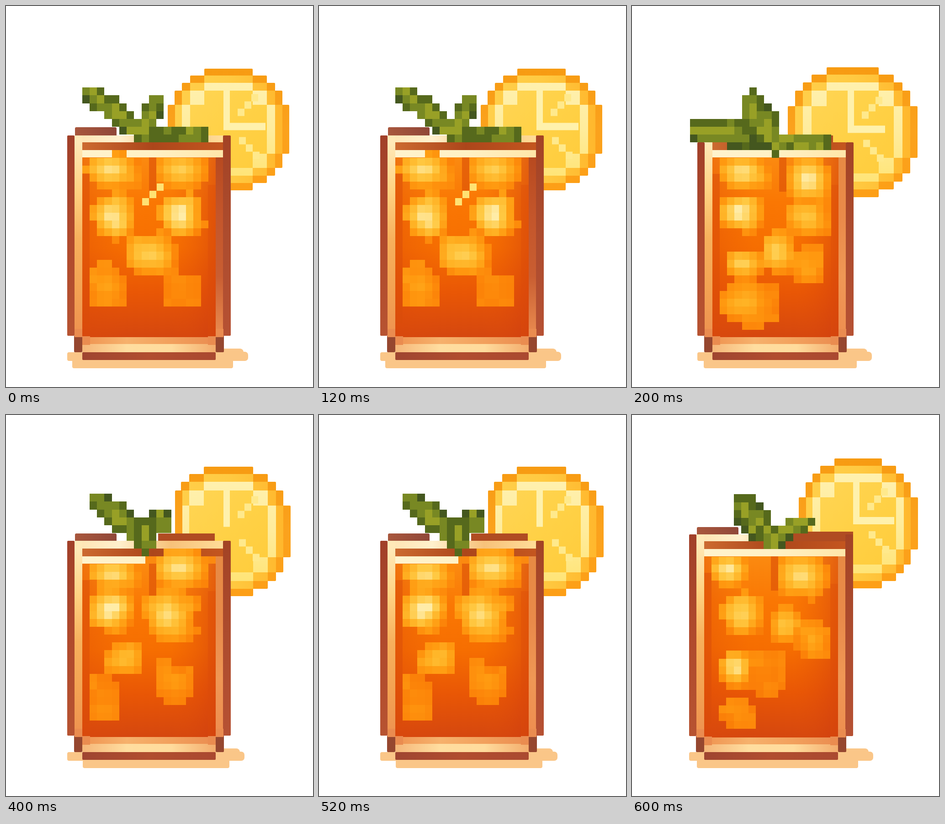
These frames come from a looping animation (672 px wide and 833 px high, 800 ms). An HTML page with a canvas:

```html
<!DOCTYPE html>
<html lang="en">
<head>
<meta charset="utf-8">
<title>Iced tea</title>
<style>
html, body { margin: 0; width: 100%; height: 100%; overflow: hidden; background: #fff; }
canvas { display: block; }
</style>
</head>
<body>
<canvas id="stage" width="672" height="833"></canvas>
<script>
const ctx = document.getElementById('stage').getContext('2d');
const CELL_W = 16.25, CELL_H = 17.1;

const BROWN = '#b04c22', UMBER = '#96472f', SALMON = '#ea8c50';
const ICE = [[240, 108, 4], [252, 130, 8], [255, 154, 16], [255, 178, 36], [255, 200, 66], [255, 219, 118], [255, 240, 180]];
const MINT = ['#44571f', '#56691c', '#788823', '#98a026'];

function rect(fill, x0, y0, x1, y1) {
  ctx.fillStyle = fill;
  ctx.fillRect(x0, y0, x1 - x0, y1 - y0);
}

function soft(fill, x0, y0, x1, y1, r = 2) {
  ctx.fillStyle = fill;
  ctx.beginPath();
  ctx.roundRect(x0, y0, x1 - x0, y1 - y0, r);
  ctx.fill();
}

function blend(x0, y0, x1, y1, ...colors) {
  const g = ctx.createLinearGradient(x0, y0, x1, y1);
  colors.forEach((c, i) => g.addColorStop(i / (colors.length - 1), c));
  return g;
}
const across = (x0, x1, ...colors) => blend(x0, 0, x1, 0, ...colors);
const down = (y0, y1, ...colors) => blend(0, y0, 0, y1, ...colors);

function dots(fill, x, y, dx, dy, n) {
  for (let k = 0; k < n; k++) rect(fill, x + dx * k, y + dy * k, x + dx * k + 15, y + dy * k + 16);
}

function noise(a, b) {
  const s = Math.sin(a * 12.9898 + b * 78.233) * 43758.5453;
  return s - Math.floor(s);
}

const clamp = v => Math.max(0, Math.min(1, v));

// Fills the big pixels inside a box; pick gets the cell's centre and indices.
function cells({ L, rim }, x0, y0, x1, y1, pick) {
  const gx = i => Math.round(L + i * CELL_W), gy = j => Math.round(rim + j * CELL_H);
  for (let j = Math.floor((y0 - rim) / CELL_H); gy(j) < y1; j++)
    for (let i = Math.floor((x0 - L) / CELL_W); gx(i) < x1; i++) {
      const fill = pick((gx(i) + gx(i + 1)) / 2, (gy(j) + gy(j + 1)) / 2, i, j);
      if (fill) rect(fill, gx(i), gy(j), gx(i + 1), gy(j + 1));
    }
}

function iceColor(t) {
  const f = clamp(t) * (ICE.length - 1), k = Math.min(ICE.length - 2, Math.floor(f));
  return `rgb(${ICE[k].map((c, n) => Math.round(c + (ICE[k + 1][n] - c) * (f - k)))})`;
}

// A blocky cube that fades from a bright core to the tea around it.
function cube(p, [x, y, w, h, light]) {
  cells(p, x - w, y - h, x + w, y + h, (cx, cy, i, j) => {
    const dx = (cx - x) / w, dy = (cy - y) / h;
    const d = Math.cbrt(Math.abs(dx) ** 3 + Math.abs(dy) ** 3);
    const grain = noise(i >> 1, j >> 1) - 0.5;
    if (d > 1 + grain * 0.2) return null;
    const core = clamp(1.15 - Math.hypot(dx + 0.1, dy + 0.1));
    return iceColor(0.17 + (light - 0.17) * core + grain * 0.14);
  });
}

// A leaf swells around its midrib and tapers at both ends.
function leaf(p, [x0, y0, x1, y1, w]) {
  const vx = x1 - x0, vy = y1 - y0;
  cells(p, Math.min(x0, x1) - w, Math.min(y0, y1) - w, Math.max(x0, x1) + w, Math.max(y0, y1) + w, (cx, cy, i, j) => {
    const t = clamp(((cx - x0) * vx + (cy - y0) * vy) / (vx * vx + vy * vy));
    const d = Math.hypot(cx - x0 - vx * t, cy - y0 - vy * t) / (w * (0.75 + 0.25 * Math.sin(Math.PI * t)));
    if (d > 1) return null;
    return MINT[Math.floor(clamp(0.95 - d * 0.75 + (noise(i, j) - 0.5) * 0.5) * 3.99)];
  });
}

// Stepped disc of n rings: each corner pairs a wide step with a low one.
function disc(fill, { x, y, rx, ry, cut }, n) {
  const steps = [0.4, 0.635, 0.765, 0.885, 1];
  const left = cut + (n < 5 ? 16 : 0);
  for (let i = 0; i < n; i++) {
    const w = steps[i] * rx, h = steps[n - 1 - i] * ry;
    soft(fill, Math.max(left, Math.round(x - w)), Math.round(y - h), Math.round(x + w), Math.round(y + h), n > 4 ? 2 : 0);
  }
}

function lemon(f) {
  const { x, y, rx, ry, bar } = f, pith = '#fff1ac', seed = '#ffe98c';
  disc(down(y - ry, y + ry, '#f79b12', '#fba21d', '#fd9f16'), f, 5);
  disc(across(x - rx, x + rx, '#ffd04c', '#ffca42', '#ffb52a'), f, 4);
  disc(down(y - ry, y + ry, '#fff2b4', '#ffec9c', '#ffe26c'), f, 3);
  disc(blend(x - rx, y - ry, x + rx, y + ry, '#ffd75c', '#ffd146', '#ffc936'), f, 2);
  rect(pith, x - 11, y - ry * 0.64, x + 3, y - 10);
  rect(pith, x - 11, y - 14, x - 11 + bar, y + 2);
  dots(seed, x + 20, y - 45, 15, -16, 3);
  dots(seed, x + 23, y + 17, 15, 16, 3);
}

function shadow({ L, base, edge, foot }) {
  const c = '#fac688';
  soft(c, L, base - 17, L + 60, base + 2, 4);
  soft(c, foot, base - 10, edge - 33, base + 18, 4);
  soft(c, edge - 90, base - 25, edge - 10, base, 8);
  soft(c, edge - 50, base - 18, edge, base + 2, 7);
}

function glass({ L, R, top, rim, wall, base, lid, foam, bar, dark }) {
  const a = L + 16, b = L + 33, c = R - 17, d = R - 33;
  const pour = rim + 33, floor = wall + 4, sole = base - 17;

  soft(across(L, L + 115, '#ad5a3e', '#8e4638'), L + 17, lid, L + 108, top + 4, 3);
  rect(across(L, c, '#ffe2ad', '#fff0cd', '#f7c27a', '#ffdc98'), a, top, c, rim);
  rect(BROWN, ...bar);
  rect(down(rim, wall, '#ffe9b8', '#ffd282', '#f7b05c', '#f3a353', '#ee9250'), a, top, b, wall);
  rect(across(b, c, '#cc6a30', '#ac461b', '#c4561f'), b, rim, c, rim + 17);
  rect(down(pour, floor, '#fb8a10', '#fa7703', '#f66e01', '#e95705', '#d5470f'), b, rim + 17, d, floor);
  rect(across(b, d, 'rgba(219,73,10,.35)', 'rgba(226,80,8,0)', 'rgba(226,80,8,0)', 'rgba(205,58,16,.5)'), b, pour, d, floor);
  rect('rgba(217,76,10,.5)', b, pour + 36, b + 16, floor - 30);
  rect('rgba(217,76,10,.35)', d - 17, pour + 60, d, floor);
  rect('rgba(222,84,8,.7)', L + 179, pour, L + 195, pour + 75);

  const side = dark ? ['#b84a20', '#c4562b', '#c95e32', SALMON] : ['#e78a44', '#e98a4a', '#ef9755', '#ee8e50'];
  rect(down(pour, wall, ...side), d, rim + 17, c, wall + 20);
  rect(across(b, c, '#fff3cd', '#fff1c4', '#ffe6a8'), b, rim + 17, foam, pour);

  soft(down(top, wall, '#a14029', '#b04a2c', '#b75331'), L, top, a, wall + 1);
  soft(down(top, wall, '#a34325', '#ad4c2e', '#b65133'), c, top, R, wall + 1);
  for (const x of [a - 1, d]) soft(UMBER, x, wall, x + 18, sole);

  rect(across(b, d, '#ef9350', '#f6b16c', '#f2a05c', SALMON), b, floor, d, floor + 15);
  rect(across(b, d, '#f5b678', '#ffdd9f', '#ffdb9c', '#f3ac6c'), b, floor + 15, d, sole);
  for (const x of [a, d]) rect(SALMON, x, wall - 14, x + 17, floor);
  for (const x of [b, d - 17]) rect(SALMON, x, floor - 2, x + 17, floor + 17);
  soft(across(b, d, '#9f4530', '#b14d2f', '#aa4930'), b, sole, d, base);
}

// Key measures of each pose: leaf = ends and width, cube = centre, half size and light.
const poses = [
  {
    L: 134, R: 492, top: 283, rim: 298, wall: 720, base: 774, lid: 265, edge: 530, foot: 145,
    foam: 475, bar: [445, 298, 475, 315], dark: true, fizz: 3,
    lemon: { x: 487, y: 269.5, rx: 133, ry: 133, cut: 354, bar: 92 },
    leaves: [[187, 190, 300, 280, 26], [327, 205, 305, 285, 23], [345, 281, 434, 283, 19]],
    cubes: [[235, 362, 60, 40, 0.85], [388, 362, 55, 40, 0.72], [240, 465, 50, 52, 0.95], [386, 458, 46, 50, 1],
      [320, 545, 58, 52, 0.74], [222, 612, 40, 48, 0.42], [385, 625, 48, 36, 0.22]]
  },
  {
    L: 143, R: 485, top: 298, rim: 298, wall: 720, base: 774, lid: 298, edge: 525, foot: 157,
    foam: 468, bar: [425, 283, 440, 300], fizz: 0,
    lemon: { x: 483, y: 275.5, rx: 142, ry: 142, cut: 341, bar: 82 },
    leaves: [[145, 273, 300, 284, 30], [262, 214, 300, 290, 40], [325, 297, 420, 297, 22], [311, 290, 311, 322, 14]],
    cubes: [[248, 368, 56, 38, 0.88], [390, 385, 45, 52, 0.95], [243, 455, 50, 42, 1], [390, 462, 50, 40, 0.65],
      [388, 562, 36, 42, 0.45], [322, 540, 38, 52, 0.78], [248, 568, 44, 36, 0.72], [255, 648, 66, 50, 0.46]]
  },
  {
    L: 134, R: 492, top: 275, rim: 292, wall: 700, base: 754, lid: 259, edge: 522, foot: 168,
    foam: 305, bar: [333, 259, 457, 275], fizz: 0,
    lemon: { x: 487, y: 254.5, rx: 136, ry: 141.5, cut: 370, bar: 0 },
    leaves: [[202, 190, 310, 272, 29], [333, 216, 345, 250, 23], [303, 250, 308, 282, 26]],
    cubes: [[240, 350, 58, 32, 0.85], [385, 337, 58, 44, 0.88], [233, 430, 50, 48, 1], [362, 440, 60, 58, 0.78],
      [260, 533, 46, 40, 0.6], [365, 582, 45, 46, 0.3], [215, 617, 36, 50, 0.24]]
  },
  {
    L: 125, R: 484, top: 261, rim: 276, wall: 701, base: 754, lid: 245, edge: 528, foot: 142,
    foam: 467, bar: [352, 255, 484, 276], fizz: 0,
    lemon: { x: 495, y: 237, rx: 130.5, ry: 142, cut: 365, bar: 90 },
    leaves: [[246, 202, 292, 258, 36], [386, 231, 318, 262, 20], [292, 250, 312, 282, 25]],
    cubes: [[215, 342, 44, 36, 0.92], [375, 355, 55, 48, 0.82], [245, 437, 50, 46, 0.82], [338, 465, 40, 40, 0.62],
      [395, 495, 38, 40, 0.42], [288, 565, 52, 50, 0.25], [230, 557, 36, 38, 0.92], [230, 655, 38, 28, 0.24]]
  }
];

function draw(ms) {
  const p = poses[Math.floor(ms % 800 / 200)];
  rect('#fff', 0, 0, 672, 833);
  shadow(p);
  lemon(p.lemon);
  glass(p);
  p.cubes.forEach(c => cube(p, c));
  dots('#ffe273', 330, 388, -16, 16, p.fizz);
  p.leaves.forEach(l => leaf(p, l));
}

const start = performance.now();
function tick() {
  draw(performance.now() - start);
  requestAnimationFrame(tick);
}
tick();
</script>
</body>
</html>
```
